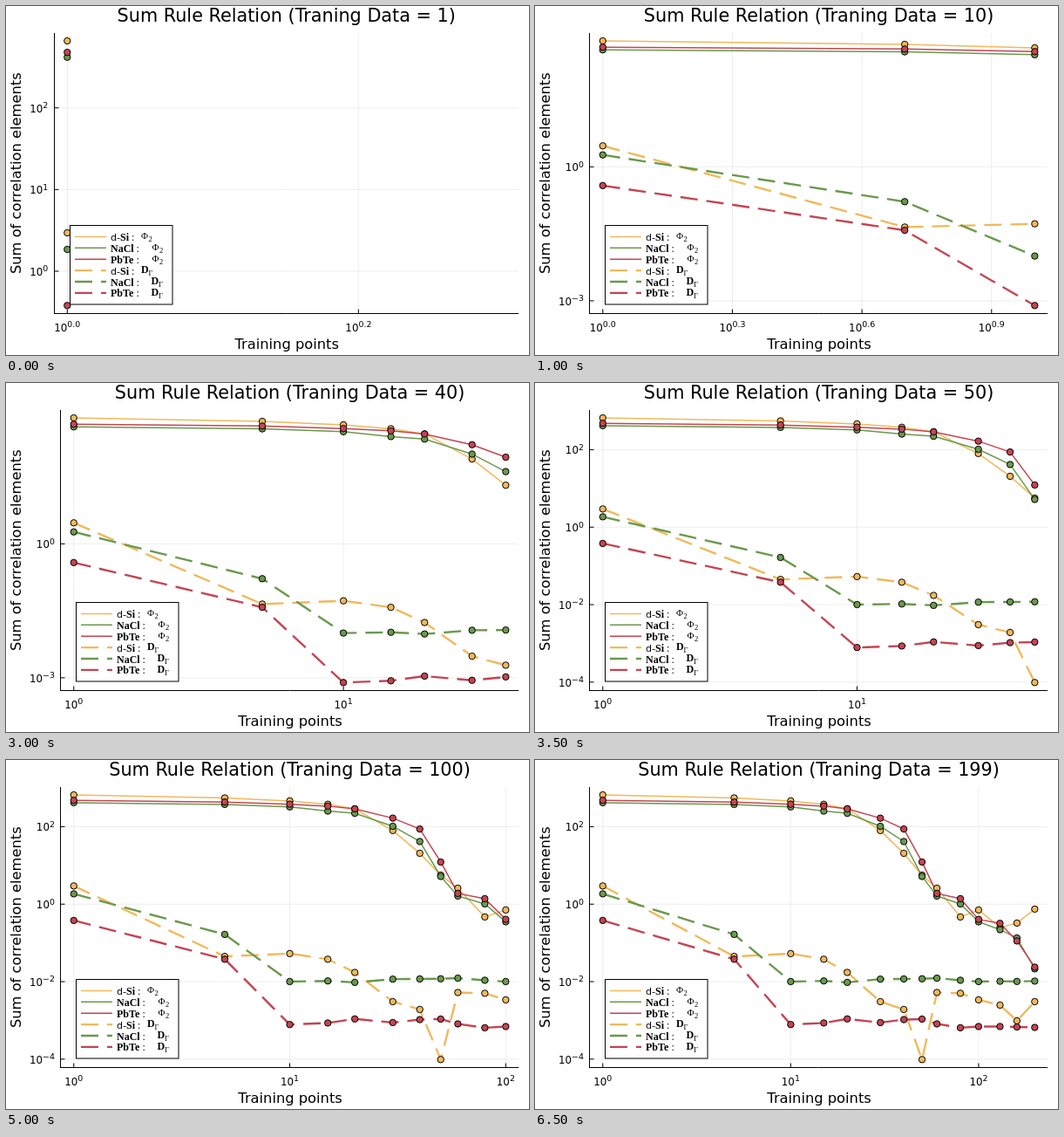
Write an HTML page with a canvas that moves like this. It is 600 by 400 pixels and loops after 7 s.

```html
<!DOCTYPE html>
<html lang="en">
<head>
<meta charset="utf-8">
<title>Sum Rule Relation</title>
<style>
  html, body { margin: 0; width: 100%; height: 100%; overflow: hidden; background: #fff; }
  canvas { display: block; }
</style>
</head>
<body>
<canvas id="chart"></canvas>
<script>
const W = 600, H = 400, STEP_MS = 500;
const TOP = 30.9, BOTTOM = 352.4, RIGHT = 588.2, PAD = 0.03;
const SANS = '"DejaVu Sans", sans-serif';
const SERIF = '"Liberation Serif", serif';
const ORANGE = '#f0b95b', GREEN = '#6a994e', RED = '#c44552';

const points = [1, 5, 10, 15, 20, 30, 40, 50, 60, 80, 100, 130, 160, 199];

// Series values are base-10 logarithms, one per training size.
const series = [
  { name: 'd-Si', symbol: 'Φ', color: ORANGE,
    logs: [2.82, 2.742, 2.665, 2.578, 2.46, 1.9, 1.313, 0.75, 0.412, -0.33, -0.15, -0.6, -0.488, -0.128] },
  { name: 'NaCl', symbol: 'Φ', color: GREEN,
    logs: [2.62, 2.575, 2.51, 2.402, 2.346, 2.01, 1.617, 0.716, 0.21, 0.007, -0.455, -0.658, -0.872, -1.67] },
  { name: 'PbTe', symbol: 'Φ', color: RED,
    logs: [2.68, 2.637, 2.58, 2.53, 2.46, 2.22, 1.94, 1.088, 0.277, 0.142, -0.392, -0.495, -0.95, -1.626] },
  { name: 'd-Si', symbol: 'D', color: ORANGE,
    logs: [0.47, -1.349, -1.276, -1.421, -1.762, -2.516, -2.718, -4.01, -2.28, -2.3, -2.47, -2.606, -3.01, -2.516] },
  { name: 'NaCl', symbol: 'D', color: GREEN,
    logs: [0.267, -0.781, -1.998, -1.981, -2.019, -1.935, -1.93, -1.926, -1.91, -1.964, -1.998, -1.99, -1.995, -1.986] },
  { name: 'PbTe', symbol: 'D', color: RED,
    logs: [-0.42, -1.421, -3.106, -3.067, -2.962, -3.056, -2.98, -2.966, -3.09, -3.19, -3.158, -3.158, -3.17, -3.182] },
];

const xSteps = [0.2, 0.5, 0.3, 0.25, 0.5];
const ySteps = [1, 2, 3, 3, 3, 3, 3];

const canvas = document.getElementById('chart');
const ratio = window.devicePixelRatio || 1;
canvas.width = W * ratio;
canvas.height = H * ratio;
canvas.style.width = W + 'px';
canvas.style.height = H + 'px';
const ctx = canvas.getContext('2d');
ctx.scale(ratio, ratio);

function axis(min, max, start, end, step) {
  const pad = (max - min) * PAD, lo = min - pad, hi = max + pad;
  const ticks = [];
  for (let i = Math.ceil(lo / step); i * step <= hi; i++) ticks.push(i * step);
  const decimals = step % 1 === 0 ? 0 : step === 0.25 ? 2 : 1;
  return {
    ticks,
    at: v => start + (v - lo) / (hi - lo) * (end - start),
    label: v => v.toFixed(decimals).replace('-', '−'),
  };
}

function line(coords, color, width, dash = []) {
  ctx.beginPath();
  coords.forEach(([x, y]) => ctx.lineTo(x, y));
  ctx.strokeStyle = color;
  ctx.lineWidth = width;
  ctx.setLineDash(dash);
  ctx.stroke();
  ctx.setLineDash([]);
}

function text(str, x, y, font, align = 'left') {
  ctx.font = font;
  ctx.textAlign = align;
  ctx.fillStyle = '#000';
  ctx.fillText(str, x, y);
}

// Draws 10^exponent; anchor is the share of the width left of x.
function power(exponent, x, y, anchor) {
  const base = `11.85px ${SANS}`, sup = `9.4px ${SANS}`;
  ctx.font = base;
  const baseWidth = ctx.measureText('10').width;
  ctx.font = sup;
  const left = x - anchor * (baseWidth + ctx.measureText(exponent).width);
  text('10', left, y, base);
  text(exponent, left + baseWidth, y - 4.7, sup);
}

function drawLegend(left) {
  const x = Math.floor(left + 17.8) + 0.5, y = 251.5;
  ctx.fillStyle = '#fff';
  ctx.fillRect(x, y, 117.5, 90.5);
  ctx.strokeStyle = '#000';
  ctx.lineWidth = 1;
  ctx.strokeRect(x, y, 117.5, 90.5);

  series.forEach(({ name, symbol, color }, i) => {
    const row = 264.4 + i * 12.9, tx = x + 46.5, bold = `bold 12px ${SERIF}`;
    const isD = symbol === 'D', short = name === 'd-Si';
    const symbolX = tx + (short ? 35 : isD ? 46.5 : 47.5);
    line([[x + 5.5, row], [x + 41.5, row]], color, isD ? 2.4 : 1.5, isD ? [20, 10] : []);
    if (short) {
      text('d-', tx, row + 4.5, `11px ${SANS}`);
      text('Si', tx + 11, row + 4.5, bold);
    } else {
      text(name, tx, row + 4.5, bold);
    }
    text(':', tx + (short ? 24 : 29.5), row + 4.5, `12px ${SERIF}`);
    text(symbol, symbolX, row + 3, isD ? bold : `11px ${SERIF}`);
    text(isD ? 'Γ' : '2', symbolX + 8.5, row + 6, `8.5px ${SERIF}`);
  });
}

function draw(frame) {
  const count = frame + 1;
  const left = frame < 2 ? 55.2 : 62.9;
  const centre = (left + RIGHT) / 2;
  const visible = series.flatMap(s => s.logs.slice(0, count));
  const xAxis = axis(0, Math.log10(Math.max(2, points[frame])), left, RIGHT, xSteps[frame] || 1);
  const yAxis = axis(Math.min(...visible), Math.max(...visible), BOTTOM, TOP, ySteps[frame] || 2);

  ctx.fillStyle = '#fff';
  ctx.fillRect(0, 0, W, H);

  const axisX = Math.floor(left) + 0.5, axisY = 352.5, grid = 'rgba(0,0,0,0.07)';
  for (const v of xAxis.ticks) {
    const x = xAxis.at(v);
    line([[x, TOP], [x, BOTTOM]], grid, 1);
    line([[x, axisY], [x, axisY - 5]], '#000', 1);
    power(xAxis.label(v), x, 373, 0.5);
  }
  for (const v of yAxis.ticks) {
    const y = yAxis.at(v);
    line([[left, y], [RIGHT, y]], grid, 1);
    line([[axisX, y], [axisX + 5, y]], '#000', 1);
    power(yAxis.label(v), left - 7, y + 5, 1);
  }
  line([[axisX, TOP], [axisX, axisY + 0.5]], '#000', 1);
  line([[axisX, axisY], [RIGHT, axisY]], '#000', 1);

  const paths = series.map(s => s.logs.slice(0, count)
    .map((v, i) => [xAxis.at(Math.log10(points[i])), yAxis.at(v)]));
  series.forEach((s, i) => {
    const isD = s.symbol === 'D';
    line(paths[i], s.color, isD ? 2.4 : 1.5, isD ? [20, 10] : []);
  });
  series.forEach((s, i) => {
    for (const [x, y] of paths[i]) {
      ctx.beginPath();
      ctx.arc(x, y, 3.7, 0, Math.PI * 2);
      ctx.fillStyle = s.color;
      ctx.fill();
      ctx.strokeStyle = '#000';
      ctx.lineWidth = 1;
      ctx.stroke();
    }
  });

  drawLegend(left);

  text(`Sum Rule Relation (Traning Data = ${points[frame]})`, centre, 18, `20.75px ${SANS}`, 'center');
  text('Training points', centre + 0.5, 393, `16.3px ${SANS}`, 'center');
  ctx.save();
  ctx.translate(16.5, 191.7);
  ctx.rotate(-Math.PI / 2);
  text('Sum of correlation elements', 0, 0, `16.3px ${SANS}`, 'center');
  ctx.restore();
}

const startTime = performance.now();
function tick() {
  const elapsed = performance.now() - startTime;
  draw(Math.floor(elapsed / STEP_MS) % points.length);
  requestAnimationFrame(tick);
}
tick();
</script>
</body>
</html>
```
